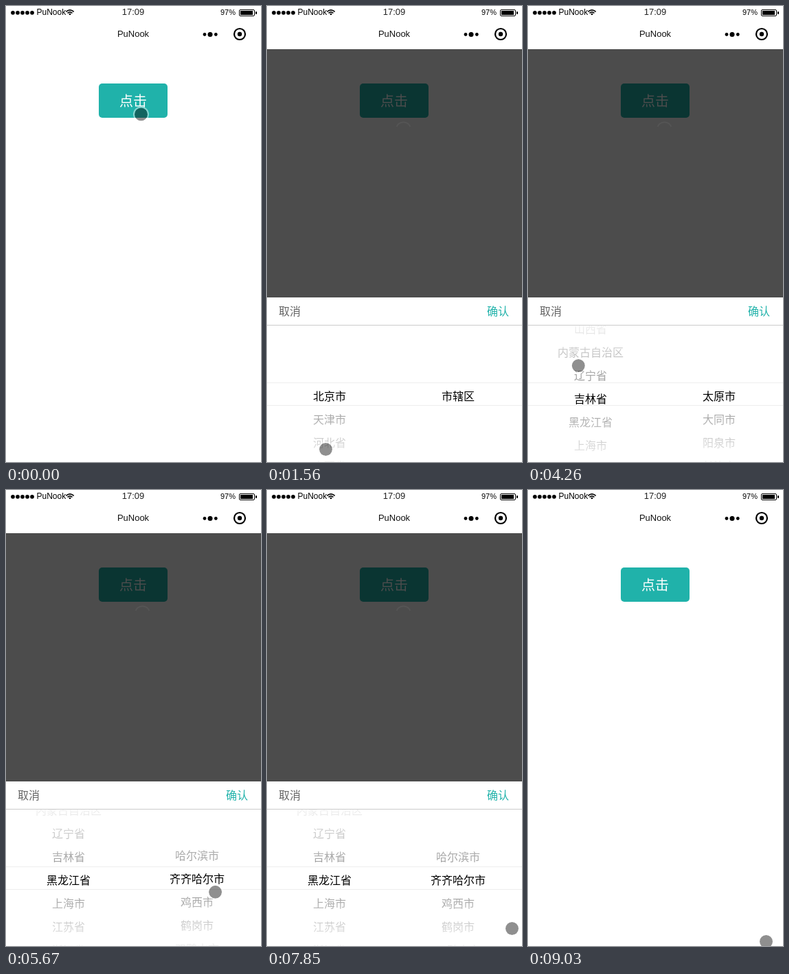
Recreate the animation shown at these times as an HTML page. Size 371 by 665 pixels, loop 9.1 s.

```html
<!DOCTYPE html>
<html lang="zh">
<head>
<meta charset="utf-8">
<style>
html, body { margin: 0; width: 100%; height: 100%; overflow: hidden; background: #fff; }
svg { display: block; }
.latin { font-family: "Liberation Sans", Arial, sans-serif; }
.cjk { font-family: "Noto Sans CJK SC", "Noto Sans CJK", "Noto Sans CJK JP", sans-serif; font-size: 16px; }
.mid { text-anchor: middle; }
</style>
</head>
<body>
<svg width="371" height="665" viewBox="0 0 371 665">
  <defs>
    <clipPath id="list"><rect y="466" width="371" height="199"/></clipPath>
    <linearGradient id="fadeTop" x2="0" y2="1">
      <stop stop-color="#fff" stop-opacity=".95"/><stop offset="1" stop-color="#fff" stop-opacity=".6"/>
    </linearGradient>
    <linearGradient id="fadeBottom" x2="0" y2="1">
      <stop stop-color="#fff" stop-opacity=".6"/><stop offset="1" stop-color="#fff" stop-opacity=".95"/>
    </linearGradient>
  </defs>
  <rect width="371" height="665" fill="#fff"/>

  <g class="latin">
    <path d="M10 9.800h28.100" stroke="#000" stroke-width="5.800" stroke-linecap="round" stroke-dasharray="0 7"/>
    <text x="44.500" y="13" font-size="12">PuNook</text>
    <g fill="none" stroke="#000" stroke-width="1.600">
      <path d="M87.300 8.300Q93 3.300 98.700 8.300"/><path d="M89.500 10.300Q93 7.400 96.500 10.300"/>
    </g>
    <path d="M91 11.400Q93 10 95 11.400L93 13.600Z"/>
    <text class="mid" x="185" y="13" font-size="13" fill="#222">17:09</text>
    <text x="312" y="13" font-size="11">97%</text>
    <rect x="339.500" y="5.500" width="22" height="9" rx="1.500" fill="none" stroke="#000"/>
    <rect x="341" y="7" width="18" height="6"/>
    <rect x="363" y="8" width="2" height="4" rx="1"/>
    <text class="mid" x="185" y="45" font-size="13" fill="#111">PuNook</text>
    <circle cx="289" cy="41.500" r="2.400"/><circle cx="297" cy="41.500" r="3.500"/><circle cx="305.300" cy="41.500" r="2.400"/>
    <circle cx="340" cy="41" r="8" fill="none" stroke="#000" stroke-width="2.200"/><circle cx="340" cy="41" r="3.200"/>
  </g>

  <rect x="135" y="113" width="100" height="50" rx="5" fill="#20b2aa"/>
  <text class="cjk mid" x="185" y="145.500" style="font-size:20px" fill="#fff">点击</text>
  <rect id="shade" y="63" width="371" height="602"/>
  <path id="trace" d="M188.500 176A11 11 0 0 1 208.500 176" fill="none" stroke="#555" stroke-width="2"/>

  <g id="panel" class="cjk">
    <rect y="425" width="371" height="240" fill="#fff"/>
    <text x="17" y="451" fill="#666">取消</text>
    <text x="320" y="451" fill="#20b2aa">确认</text>
    <path d="M0 465.500H371" stroke="#ccc"/>
    <g clip-path="url(#list)">
      <g id="left" class="mid"></g>
      <g id="right" class="mid"></g>
      <rect y="466" width="371" height="83" fill="url(#fadeTop)"/>
      <rect y="583" width="371" height="82" fill="url(#fadeBottom)"/>
      <path d="M0 549.500H371M0 582.500H371" stroke="#eee"/>
    </g>
  </g>

  <g id="cursor">
    <circle r="9.500" fill-opacity=".44"/>
    <circle r="10.500" fill="none" stroke="#fff" stroke-opacity=".45" stroke-width="2"/>
  </g>
</svg>
<script>
const LOOP = 9100, ROW = 34, OPEN = 240, CLOSE = 8500;
const $ = id => document.getElementById(id);

const provinces = '北京市 天津市 河北省 山西省 内蒙古自治区 辽宁省 吉林省 黑龙江省 上海市 江苏省 浙江省';
// time at which each city list comes in
const cities = [
  [0, '市辖区'],
  [2110, '石家庄市 唐山市 秦皇岛市 邯郸市'],
  [3140, '太原市 大同市 阳泉市 长治市'],
  [4660, '哈尔滨市 齐齐哈尔市 鸡西市 鹤岗市 双鸭山市']
];

// scroll moves: start, end, rows travelled
const leftMoves = [[1560, 2030, 2], [2600, 3140, 1.2], [3140, 3390, -.2], [3850, 4480, 4]];
const rightMoves = [[5520, 5742, 1.4], [5860, 6170, -.4]];

// pointer stops: time, x, y
const stops = [
  [0, 196.5, 158], [170, 197.5, 142], [480, 198.5, 173.5], [1180, 192, 337],
  [1560, 85.5, 646.5], [2030, 94, 578], [2600, 150, 626], [3140, 128.5, 583.5],
  [3850, 95, 624], [4480, 65, 486], [5050, 122, 626], [5520, 300, 622],
  [5742, 306, 575], [6300, 318, 690], [7770, 380, 690], [7850, 356.5, 639.5],
  [8090, 336, 405], [8390, 333, 446], [8600, 333, 446], [9030, 346.5, 658.5]
];

const progress = (t, a, b) => Math.min(1, Math.max(0, (t - a) / (b - a)));
const smooth = p => p * p * (3 - 2 * p);
const mix = (a, b, p) => a + (b - a) * p;
const scroll = (moves, t) =>
  moves.reduce((sum, [a, b, rows]) => sum + rows * ROW * smooth(progress(t, a, b)), 0);

function pointer(t) {
  const i = Math.max(0, stops.findLastIndex(s => s[0] <= t));
  const [t0, x0, y0] = stops[i], [t1, x1, y1] = stops[i + 1] || [LOOP, x0, y0];
  const p = smooth(progress(t, t0, t1));
  return [mix(x0, x1, p), mix(y0, y1, p)];
}

function addColumn(parent, x, names) {
  const make = tag => document.createElementNS('http://www.w3.org/2000/svg', tag);
  const g = make('g');
  names.split(' ').forEach((name, i) => {
    const text = make('text');
    text.setAttribute('x', x);
    text.setAttribute('y', 575 + i * ROW);
    text.textContent = name;
    g.append(text);
  });
  parent.append(g);
  return g;
}

const move = (el, x, y) => el.setAttribute('transform', `translate(${x} ${y})`);
const show = (el, on) => el.setAttribute('display', on ? 'inline' : 'none');

addColumn($('left'), 91, provinces);
const lists = cities.map(c => addColumn($('right'), 278, c[1]));

function draw(t) {
  const current = cities.findLastIndex(c => c[0] <= t);
  lists.forEach((g, i) => show(g, i === current));
  const hidden = 1 - progress(t, OPEN, OPEN + 500);
  const closing = smooth(progress(t, CLOSE, CLOSE + 370));
  move($('panel'), 0, 240 * (hidden ** 2 + closing));
  $('shade').setAttribute('fill-opacity', .7 * (1 - hidden ** 5) * (1 - closing));
  show($('trace'), t > 600 && t < CLOSE);
  move($('left'), 0, -scroll(leftMoves, t));
  move($('right'), 0, -scroll(rightMoves, t));
  move($('cursor'), ...pointer(t));
}

const start = performance.now();
function frame() {
  draw((performance.now() - start) % LOOP);
  requestAnimationFrame(frame);
}
frame();
</script>
</body>
</html>
```
